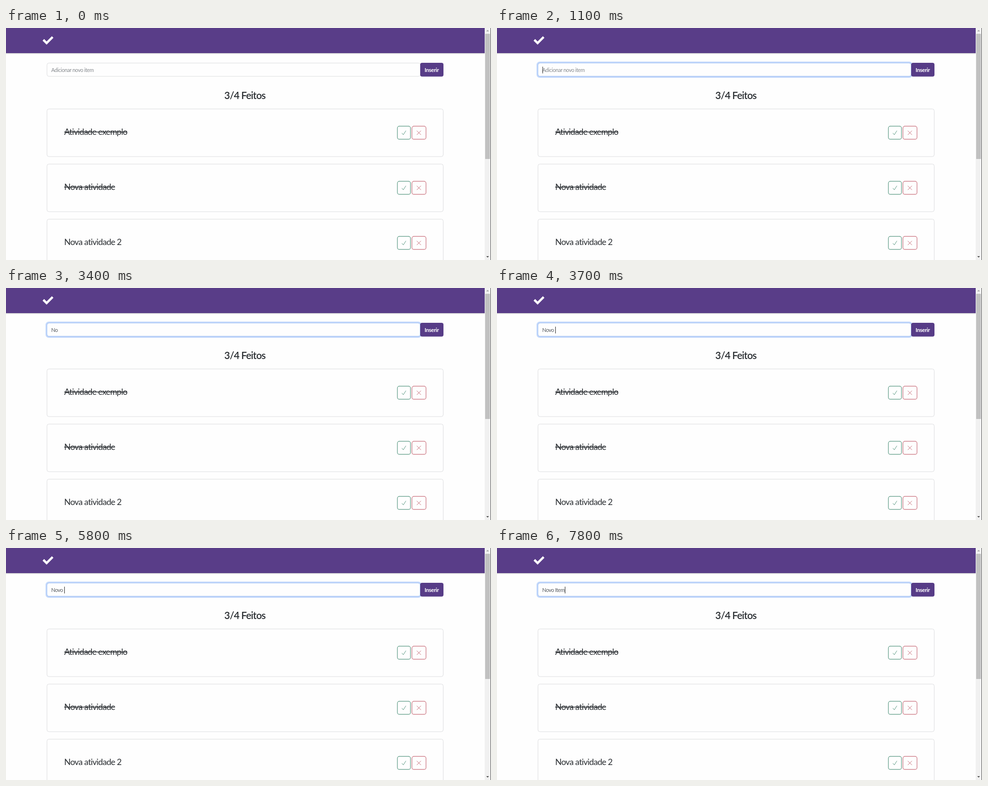
Animation, 1000 px wide and 480 px high, one loop 8000 ms. Source, as an HTML page:

```html
<!DOCTYPE html>
<html lang="pt-BR">
<head>
<meta charset="utf-8">
<title>Lista de atividades</title>
<style>
  html, body { margin: 0; width: 100%; height: 100%; overflow: hidden; background: #fefefe; }
  svg { display: block; width: 1000px; height: 480px; }
  text { font-family: Lato, "Open Sans", sans-serif; letter-spacing: -.04em; fill: #292d31; white-space: pre; }
  .title { font-size: 20.5px; font-weight: 600; text-anchor: middle; }
  .item { font-size: 17.5px; }
  .field { font-size: 10.9px; fill: #55595e; }
  .hint { fill: #85898d; }
  .insert { font-size: 11.5px; font-weight: 700; fill: #fff; text-anchor: middle; }
  .box { fill: #fefefe; stroke: #dddee0; }
  .strike { stroke: #292d31; stroke-width: 1.6; }
  .done { fill: none; stroke: #5b9984; }
  .remove { fill: none; stroke: #c9707c; }
</style>
</head>
<body>
<svg viewBox="0 0 1000 480">
  <defs>
    <linearGradient id="shade" x2="0" y2="1">
      <stop stop-color="#000" stop-opacity=".16"/>
      <stop offset="1" stop-color="#000" stop-opacity="0"/>
    </linearGradient>
    <g id="card">
      <rect class="box" x="84.5" y="167.5" width="817" height="98.5" rx="4"/>
      <g class="done">
        <rect x="807" y="203.2" width="27" height="27" rx="4" stroke-width="1.2"/>
        <path d="M816.3 217.3l2.9 3.6 5.3-8.4"/>
      </g>
      <g class="remove">
        <rect x="837" y="203.2" width="29" height="27" rx="4" stroke-width="1.2"/>
        <path d="M847 212.5l8.6 8.6m0-8.6l-8.6 8.6"/>
      </g>
    </g>
  </defs>

  <rect width="987" height="52" fill="#593d88"/>
  <rect y="52" width="987" height="3" fill="url(#shade)"/>
  <path d="M77 24.5l6.7 6.7L96.2 18.7" fill="none" stroke="#fff" stroke-width="4.6"/>

  <rect class="box" x="84.5" y="72.5" width="770" height="27.5" rx="4"/>
  <g id="focus" fill="none">
    <rect x="83.2" y="71.2" width="772" height="30" rx="5" stroke="#c3d8fb" stroke-width="3.4"/>
    <rect x="84.5" y="72.5" width="769.5" height="27.5" rx="4" stroke="#a3c3f5"/>
  </g>
  <rect x="854" y="72" width="48" height="28.5" rx="4" fill="#573c87"/>
  <text class="insert" x="877.7" y="91">Inserir</text>
  <text class="field hint" id="hint" x="93.3" y="91">Adicionar novo item</text>
  <text class="field" id="typed" x="93.3" y="91" xml:space="preserve"></text>
  <rect id="caret" y="80" width="1" height="14" fill="#222"/>

  <text class="title" x="492.5" y="147">3/4 Feitos</text>

  <use href="#card"/>
  <use href="#card" y="114"/>
  <use href="#card" y="228"/>
  <text class="item" x="120" y="221">Atividade exemplo</text>
  <text class="item" x="120" y="335">Nova atividade</text>
  <text class="item" x="120" y="449">Nova atividade 2</text>
  <path class="strike" d="M120 215.3h130M120 329.3h103"/>

  <rect x="987" width="12" height="480" fill="#f1f1f1"/>
  <rect x="988" y="12" width="10" height="259" fill="#c1c1c1"/>
  <path d="M990.2 7h5.6L993 4z" fill="#a3a3a3"/>
  <path d="M990.2 472h5.6L993 475z" fill="#505050"/>
  <rect x="999" width="1" height="480" fill="#555"/>
</svg>
<script>
  const LOOP = 8000;
  // Start time, typed text, caret visibility
  const steps = [
    [0, '', 0], [200, '', 1], [600, '', 0], [1100, '', 1], [1700, '', 0],
    [2200, '', 1], [2700, '', 0], [2900, 'No', 1], [3400, 'No', 0],
    [3500, 'Novo', 1], [3700, 'Novo ', 1], [4200, 'Novo ', 0], [4700, 'Novo ', 1],
    [5300, 'Novo ', 0], [5800, 'Novo ', 1], [6400, 'Novo ', 0], [6800, 'Novo ', 1],
    [7100, 'Novo I', 1], [7400, 'Novo It', 1], [7500, 'Novo Ite', 1], [7800, 'Novo Item', 1]
  ];
  const byId = id => document.getElementById(id);
  const [focus, hint, typed, caret] = ['focus', 'hint', 'typed', 'caret'].map(byId);

  function draw() {
    const time = performance.now() % LOOP;
    const [, text, caretOn] = steps.findLast(([start]) => start <= time);
    focus.style.opacity = time < 100 ? 0 : time < 200 ? .5 : 1;
    hint.style.opacity = text ? 0 : 1;
    caret.style.opacity = caretOn;
    if (typed.textContent !== text) typed.textContent = text;
    caret.setAttribute('x', 93.7 + (text ? typed.getComputedTextLength() : 0));
    requestAnimationFrame(draw);
  }
  draw();
</script>
</body>
</html>
```
